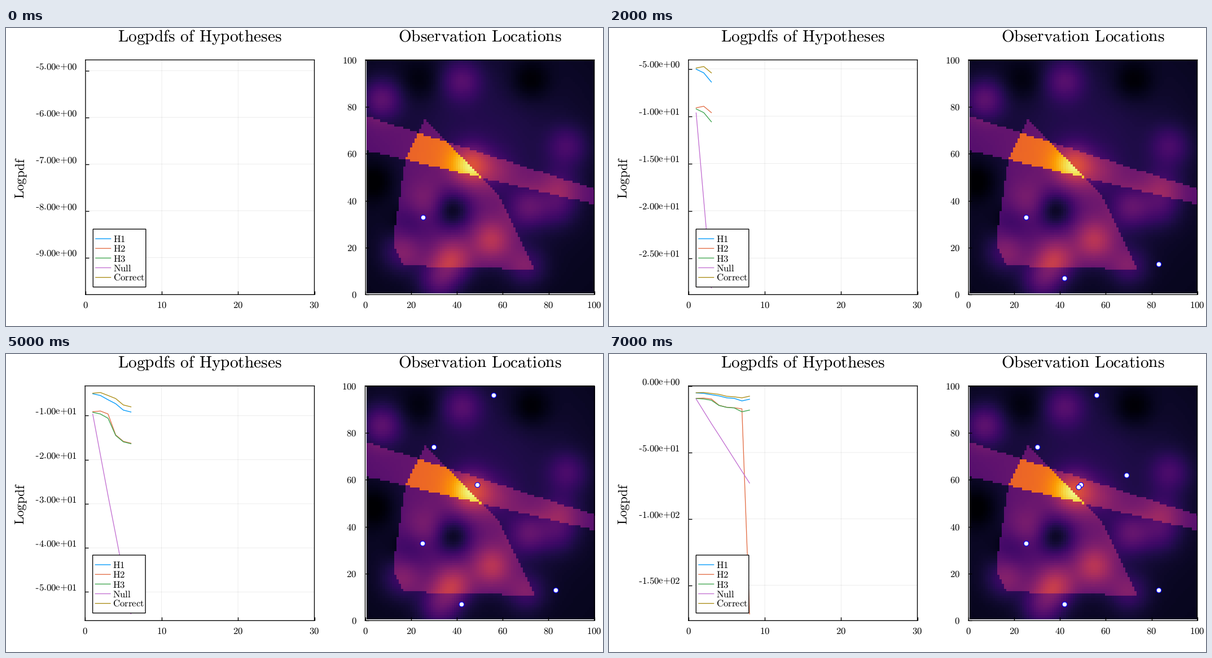
A matplotlib script for the animation above (8 s loop, 1058 px wide and 529 px high).

```python
import numpy as np
import matplotlib.pyplot as plt
from matplotlib.animation import FuncAnimation
from matplotlib.patches import Rectangle
from matplotlib.path import Path

W, H = 1058, 529
PT = 0.72  # points per pixel at 100 dpi
EM = 16.8  # label size in pixels
LINE = 1.35 * PT
TOP, BOTTOM = 56.6, 473.3
TITLE_Y, XLABEL_Y = 24.3, 496.6

plt.rcParams.update({
    "mathtext.fontset": "cm",
    "path.snap": False,
    "text.hinting": "none",
    "axes.linewidth": LINE,
})

STEPS = np.arange(1, 9)
SITES = [(25, 33), (83, 13), (42, 7), (49, 58), (30, 74), (56, 96), (69, 62), (48, 57)]


def drop(step, amount):
    """Evidence lost from the given observation onwards."""
    return -amount * (STEPS >= step)


correct = np.array([-4.91, -4.75, -5.42, -6.12, -7.57, -8.0, -8.76, -7.5])
null = np.array([-9.65, -18.9, -28.15, -36.97, -45.98, -55.0, -64.03, -73.0])
h1 = correct - 0.12 + drop(2, 0.55) + drop(3, 0.3) + drop(4, 0.2) + drop(7, 1.13)
h2 = correct - 4.2 + drop(4, 4.05) + drop(8, 155.9)
h3 = h1 - 4.2 + drop(4, 3) + drop(7, 1)
SERIES = {
    "H1": ("#009afa", h1),
    "H2": ("#e36f47", h2),
    "H3": ("#3ea44e", h3),
    "Null": ("#c371d2", null),
    "Correct": ("#ac8e18", correct),
}

REGION = Path([(26, 74.6), (49.3, 50.7), (57.6, 43), (73.8, 10.57), (16.5, 12.3),
               (12.6, 20), (12.6, 26.7), (17.5, 57.8), (23, 69), (26, 74.6)])

# Warm and cool spots: x, y, strength
SPOTS = [
    (7, 83, 0.19), (42, 91, 0.15), (24, 91, -0.06), (72, 91, -0.08),
    (88, 63, 0.13), (71, 37, 0.17), (84, 37, 0.10), (32, 6, 0.18),
    (4, 48, -0.08), (26, 39, 0.09), (38, 36, -0.22), (20, 31, -0.08),
    (16, 18, 0.13), (38, 15, 0.24), (55, 23, 0.23), (70, 12, 0.12),
    (46, 55, 0.27), (57, 52, 0.07), (85, 46, 0.10),
]


def bump(x, y, cx, cy, width):
    return np.exp(-((x - cx) ** 2 + (y - cy) ** 2) / (2 * width ** 2))


def heat_map():
    x, y = np.meshgrid(np.arange(1.0, 101), np.arange(1.0, 101))
    cells = np.column_stack([x.ravel(), y.ravel()])
    inside = REGION.contains_points(cells).reshape(x.shape)
    band = (y < 76 - 0.311 * x) & (y > 61.4 - 0.23 * x)
    heat = 0.05 + 0.09 * bump(x, y, 50, 60, 30)
    heat += 0.17 * inside + 0.18 * band + 0.2 * (inside & band)
    for cx, cy, strength in SPOTS:
        heat += strength * bump(x, y, cx, cy, 6)
    return np.clip(heat, 0, 1)


HEAT = heat_map()
fig = plt.figure(figsize=(W / 100, H / 100), dpi=100, facecolor="white")


def nice_ticks(lo, hi):
    """Multiples of the widest round step that still gives four ticks."""
    for step in (50, 20, 10, 5, 2, 1):
        ticks = np.arange(np.ceil(lo / step), np.floor(hi / step) + 1) * step + 0.0
        if len(ticks) >= 4:
            return ticks


def label(ax, x, y, text, size=EM, **kw):
    body = text.replace("+", "{+}").replace(" ", r"\hspace{0.38}")
    kw = {"ha": "center", "va": "baseline", **kw}
    ax.text(x, y, r"$\mathrm{%s}$" % body, fontsize=size * PT, **kw)


def sci_label(ax, right, y, value):
    text = f"{value:.2e}"
    label(ax, right, y, text.lstrip("-"), ha="right")
    if value < 0:  # mathtext would set a long minus, so draw the hyphen
        start = right - 4.333 * EM
        ax.plot([start + 0.01 * EM, start + 0.28 * EM], [y - 0.216 * EM] * 2,
                color="black", lw=0.062 * EM * PT, solid_capstyle="butt")


def make_axes(left, right, xlim, ylim, xticks, yticks):
    ax = fig.add_axes([left / W, 1 - BOTTOM / H, (right - left) / W, (BOTTOM - TOP) / H])
    ax.set(xlim=xlim, ylim=ylim, xticks=xticks, yticks=yticks)
    ax.tick_params(direction="in", length=6 * PT, width=LINE,
                   labelbottom=False, labelleft=False)
    ax.set_axisbelow(True)
    return ax


def draw_legend(ax, left):
    ax.add_patch(Rectangle((left, 357), 93.5, 102.8, fc="white", ec="black",
                           lw=LINE, zorder=3))
    for k, (name, (color, _)) in enumerate(SERIES.items()):
        y = 374.1 + 17.15 * k
        ax.plot([left + 4, left + 32], [y, y], color=color, lw=LINE,
                solid_capstyle="butt", zorder=4)
        label(ax, left + 35.6, y + 5.8, name, ha="left", zorder=4)


def draw(i):
    fig.clear()
    n = i + 1
    values = np.array([v[:n] for _, v in SERIES.values()])
    pad = 0.03 * np.ptp(values)
    lo, hi = values.min() - pad, values.max() + pad
    yticks = nice_ticks(lo, hi)

    # Labels that all end in e+01 are a touch narrower and pull the plots left
    size = np.abs(yticks)
    shift = -0.7 if size.min() >= 10 and size.max() < 100 else 0
    left, right = 140.9 + shift, 546.5
    map_left, map_right = 637.2 + shift, 1042.6

    chart = make_axes(left, right, (0, 30), (lo, hi), range(0, 31, 10), yticks)
    chart.grid(color="black", alpha=0.1, lw=0.7 * PT)
    for color, series in SERIES.values():
        chart.plot(STEPS[:n], series[:n], color=color, lw=LINE)

    hundred = range(0, 101, 20)
    field = make_axes(map_left, map_right, (0, 100), (0, 100), hundred, hundred)
    field.imshow(HEAT, cmap="inferno", vmin=0, vmax=1, origin="lower", aspect="auto",
                 extent=(0.5, 100.5, 0.5, 100.5), interpolation="nearest")
    field.set(xlim=(0, 100), ylim=(0, 100))
    for x, y in SITES[:n]:
        field.plot(x, y, "o", ms=8.7 * PT, mfc="white", mec="blue", mew=1.2 * PT, zorder=3)

    page = fig.add_axes([0, 0, 1, 1])
    page.set(xlim=(0, W), ylim=(H, 0))
    page.axis("off")
    label(page, (left + right) / 2, TITLE_Y, "Logpdfs of Hypotheses", 29.4)
    label(page, (map_left + map_right) / 2, TITLE_Y, "Observation Locations", 29.4)
    label(page, 33, 265.8, "Logpdf", 23.1, rotation=90, rotation_mode="anchor")

    for v in range(0, 31, 10):
        label(page, left + (right - left) * v / 30, XLABEL_Y, str(v))
    for v in yticks:
        y = TOP + (hi - v) / (hi - lo) * (BOTTOM - TOP)
        sci_label(page, left - 14.8, y - 2.5, v)
    for v in hundred:
        label(page, map_left + (map_right - map_left) * v / 100, XLABEL_Y, str(v))
        label(page, map_left - 15, BOTTOM - (BOTTOM - TOP) * v / 100 + 5.7, str(v), ha="right")
    draw_legend(page, left + 13.4)
    return []


anim = FuncAnimation(fig, draw, frames=8, interval=1000, repeat=True, repeat_delay=0)
plt.show()
```
